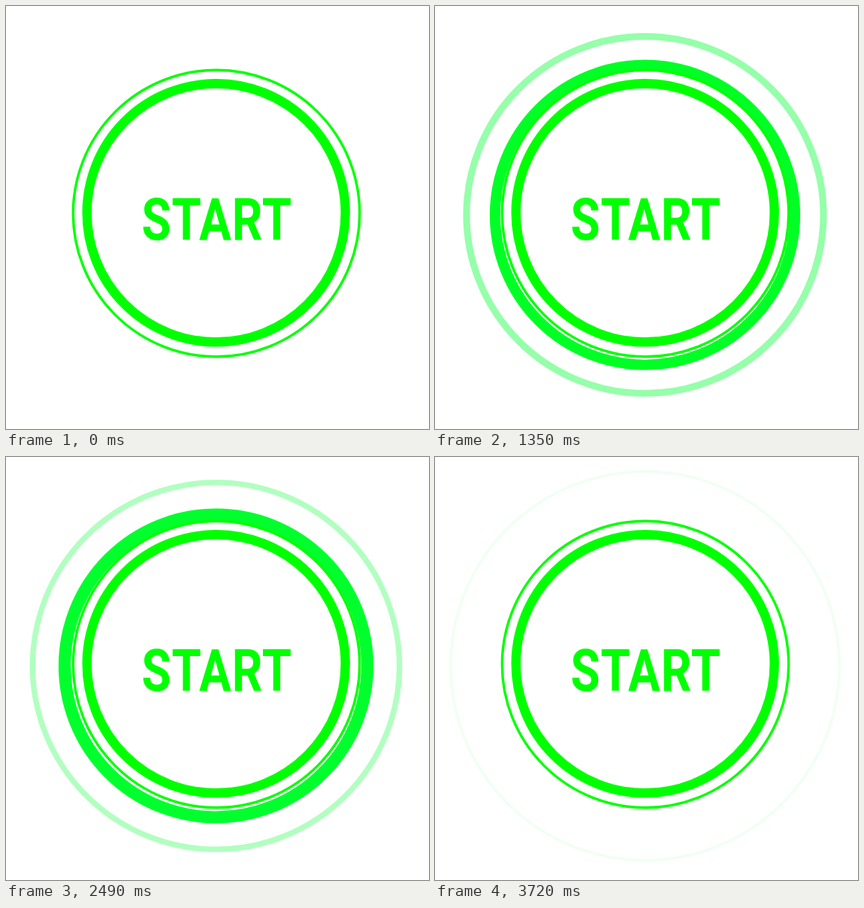
Animation, 563 px wide and 563 px high, one loop 4320 ms. Source, as an HTML page:

```html
<!DOCTYPE html>
<html lang="en">
<head>
<meta charset="utf-8">
<title>Start button</title>
<style>
  html, body { margin: 0; width: 100%; height: 100%; overflow: hidden; background: #fff; }
  svg { display: block; width: 100vw; height: 100vh; }
  circle { fill: none; stroke: #0f0; }
  text { font: 700 78.5px Roboto, sans-serif; letter-spacing: 1.2px; text-anchor: middle; fill: #0f0; }
</style>
</head>
<body>
<svg viewBox="0 0 563 563">
  <g id="pulses"></g>
  <circle cx="280" cy="276" r="190.7" stroke-width="3.4"/>
  <circle cx="279.7" cy="275.3" r="172" stroke-width="12.4"/>
  <text transform="translate(280.8 311) scale(.81 1)">START</text>
</svg>
<script>
const LOOP = 4320, STEP = 30, LAST = 3720;
const START = 192, PEAK = 212, END = 263.6;

// Each pulse: [time in ms, outer radius]
const pulses = [
  [[0, START], [540, 211.6], [1080, 232], [1620, 252.2], [1920, END]],
  [[960, START], [1080, 196.5], [1620, 216.7], [2100, 234], [2700, 255.3], [2940, END]],
  [[2085, START], [2880, 226.5], [3720, 260.5], [3800, END]]
];

const lerp = (a, b, k) => a + (b - a) * k;

const rings = pulses.map(() => {
  const ring = document.createElementNS('http://www.w3.org/2000/svg', 'circle');
  ring.setAttribute('cx', 279.5);
  ring.setAttribute('cy', 278);
  return document.getElementById('pulses').appendChild(ring);
});

function radiusAt(keys, t) {
  if (t <= keys[0][0]) return null;
  const i = keys.findIndex(key => t < key[0]);
  if (i < 0) return null;
  const [t0, r0] = keys[i - 1], [t1, r1] = keys[i];
  return lerp(r0, r1, (t - t0) / (t1 - t0));
}

function drawRing(ring, outer) {
  ring.style.display = outer === null ? 'none' : '';
  if (outer === null) return;
  const grow = Math.min(1, (outer - START) / (PEAK - START));
  const fade = Math.max(0, (outer - PEAK) / (END - PEAK));
  const width = fade ? lerp(18, 2.7, fade) : lerp(3, 18, grow);
  ring.setAttribute('r', outer - width / 2);
  ring.setAttribute('stroke-width', width);
  ring.style.stroke = `rgb(0, 255, ${Math.round(51 * grow)})`;
  ring.style.opacity = 1 - fade;
}

function draw(now) {
  const t = Math.min(LAST, Math.floor((now % LOOP) / STEP) * STEP);
  rings.forEach((ring, i) => drawRing(ring, radiusAt(pulses[i], t)));
}

const origin = performance.now();
function tick() {
  draw(Math.max(0, performance.now() - origin));
  requestAnimationFrame(tick);
}
tick();
</script>
</body>
</html>
```
